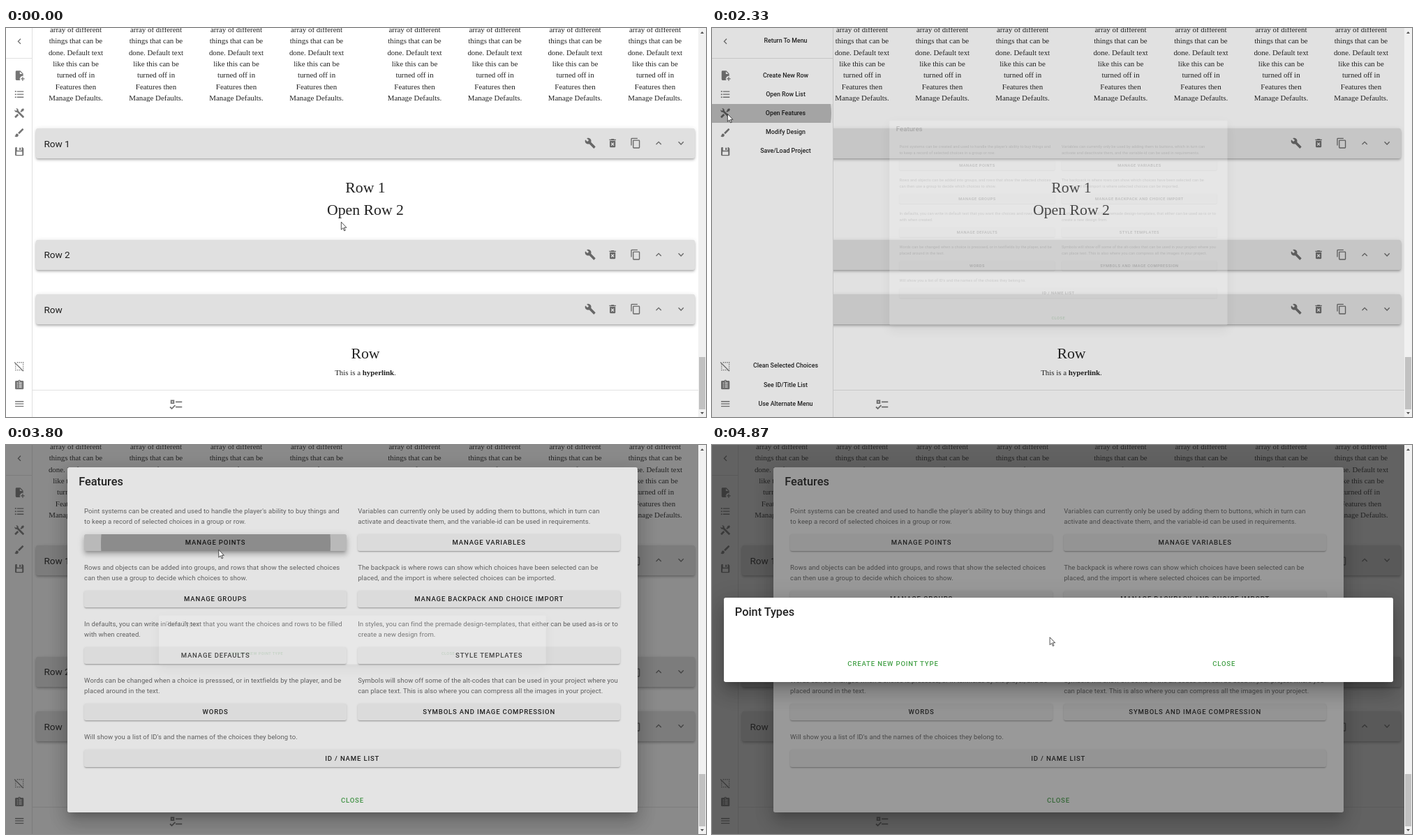
These frames come from a looping animation (1003 px wide and 558 px high, 5.99 s). An HTML page:

```html
<!DOCTYPE html>
<html lang="en">
<head>
<meta charset="utf-8">
<title>Row editor</title>
<style>
html, body { margin: 0; width: 100%; height: 100%; overflow: hidden; background: #fff; }
body { position: relative; font: 9.52px/20px Roboto, sans-serif; color: rgba(0,0,0,.87); }
div, svg { position: absolute; }
svg { fill: rgba(0,0,0,.54); fill-rule: evenodd; overflow: visible; }
.full { left: 0; top: 0; width: 992px; height: 558px; }
.mid { width: 400px; text-align: center; white-space: nowrap; }
.left { white-space: nowrap; }
.serif { font: 10.88px/16.32px "Liberation Serif", serif; }
.big { font-size: 21.76px; line-height: 20px; }
.bar { background: #e0e0e0; border-radius: 2.7px; box-shadow: 0 1.4px 2.7px -.7px rgba(0,0,0,.2), 0 2.7px 3.4px rgba(0,0,0,.14), 0 .7px 6.8px rgba(0,0,0,.12); }
.name { font-size: 13.6px; }
.drawer { left: 0; top: 0; height: 558px; background: #fff; overflow: hidden; box-sizing: border-box; border-right: 1px solid #e0e0e0; }
.item { left: 0; width: 100%; height: 27.2px; overflow: hidden; }
.item span { position: absolute; left: 38px; right: 0; font: 500 8.84px/27.2px Roboto, sans-serif; text-align: center; white-space: nowrap; overflow: hidden; }
.mini span { display: none; }
.scrim { background: #212121; }
.dialog { transform-origin: 496.25px 279.5px; }
.card { background: #fff; border-radius: 2.7px; box-shadow: 0 7.5px 10px -4.8px rgba(0,0,0,.2), 0 16px 26px 2px rgba(0,0,0,.14), 0 6px 31px 5.4px rgba(0,0,0,.12); }
.title { font-size: 16.32px; font-weight: 500; }
.note { color: rgba(0,0,0,.6); letter-spacing: .0071em; line-height: 14.96px; white-space: nowrap; }
.btn { background: #f5f5f5; border-radius: 2.7px; box-shadow: 0 2px .7px -1.4px rgba(0,0,0,.2), 0 1.4px 1.4px rgba(0,0,0,.14), 0 .7px 3.4px rgba(0,0,0,.12); }
.btn.pressed { box-shadow: 0 3.4px 3.4px -2px rgba(0,0,0,.2), 0 5.4px 6.8px .7px rgba(0,0,0,.14), 0 2px 9.5px 1.4px rgba(0,0,0,.12); }
.caps { font-weight: 500; letter-spacing: .0893em; }
.green { color: #43a047; }
.clip { left: 0; top: 0; width: 100%; height: 100%; overflow: hidden; border-radius: inherit; }
.ripple { border-radius: 50%; background: #000; }
.track { left: 992px; top: 0; width: 11px; height: 558px; background: #f1f1f1; }
.thumb { left: 1px; top: 472px; width: 9px; height: 75px; background: #c1c1c1; }
.pointer { left: 0; top: 0; fill: #fff; stroke: #000; stroke-width: 1; }
</style>
</head>
<body>
<script>
const icons = {
  back: 'M15.4 16.6 10.8 12l4.6-4.6L14 6l-6 6 6 6z',
  up: 'M7.4 15.4 12 10.8l4.6 4.6L18 14l-6-6-6 6z',
  down: 'M7.4 8.6 12 13.2l4.6-4.6L18 10l-6 6-6-6z',
  wrench: 'M22.7 19 13.6 9.9C14.5 7.6 14 4.9 12.1 3 10.1 1 7.1.6 4.7 1.7L9 6 6 9 1.6 4.7C.4 7.1.9 10.1 2.9 12.1 4.8 14 7.5 14.5 9.8 13.6l9.1 9.1c.4.4 1 .4 1.4 0l2.3-2.3c.5-.4.5-1.1.1-1.4z',
  trash: 'M6 19a2 2 0 0 0 2 2h8a2 2 0 0 0 2-2V7H6zM8.5 11.9l1.4-1.4 2.1 2.1 2.1-2.1 1.4 1.4-2.1 2.1 2.1 2.1-1.4 1.4-2.1-2.1-2.1 2.1-1.4-1.4 2.1-2.1zM15.5 4l-1-1h-5l-1 1H5v2h14V4z',
  copy: 'M19 21H8V7h11zM19 5H8a2 2 0 0 0-2 2v14a2 2 0 0 0 2 2h11a2 2 0 0 0 2-2V7a2 2 0 0 0-2-2zM16 1H4a2 2 0 0 0-2 2v14h2V3h12z',
  add: 'M14 2H6a2 2 0 0 0-2 2v16a2 2 0 0 0 2 2h7.8A6 6 0 0 1 20 13.1V8zM13 9V3.5L18.5 9zM23 20h-3v3h-2v-3h-3v-2h3v-3h2v3h3z',
  list: 'M7 5h14v2H7zM7 11h14v2H7zM7 17h14v2H7z' + [6, 12, 18].map(y => `M2.5 ${y}a1.5 1.5 0 0 1 3 0 1.5 1.5 0 0 1-3 0z`).join(''),
  tools: 'M21.7 20.3l-1.4 1.4a1 1 0 0 1-1.4 0L7 9.9A4 4 0 0 1 2.2 4.7l2.6 2.5 2.4-2.4-2.5-2.6A4 4 0 0 1 9.9 7l11.8 11.9a1 1 0 0 1 0 1.4zM2.3 18.9a1 1 0 0 0 0 1.4l1.4 1.4a1 1 0 0 0 1.4 0l5.5-5.4-2.8-2.9zM20 2l-4 2v2l-2.2 2.2 2 2L18 8h2l2-4z',
  brush: 'M20.7 4.6l-1.3-1.3a1 1 0 0 0-1.4 0l-9 9L11.8 15l8.9-9a1 1 0 0 0 0-1.4zM7 14a3 3 0 0 0-3 3c0 1.3-1.2 2-2 2 .9 1.2 2.5 2 4 2a4 4 0 0 0 4-4 3 3 0 0 0-3-3z',
  save: 'M5 3a2 2 0 0 0-2 2v14a2 2 0 0 0 2 2h14a2 2 0 0 0 2-2V5.5L18.5 3H17v6a1 1 0 0 1-1 1H8a1 1 0 0 1-1-1V3zM12 4v5h3V4zM7 12h10a1 1 0 0 1 1 1v6H6v-6a1 1 0 0 1 1-1z',
  clean: 'M1 4.3 2.3 3 21 21.7 19.7 23z' + [3, 7, 11, 15, 19].map(v => `M${v} 19h2v2h-2z` + (v > 3 ? `M${v} 3h2v2h-2z` : '') + (v > 3 && v < 19 ? `M3 ${v}h2v2h-2zM19 ${v}h2v2h-2z` : '')).join(''),
  clipboard: 'M19 3h-4.2a3 3 0 0 0-5.6 0H5a2 2 0 0 0-2 2v14a2 2 0 0 0 2 2h14a2 2 0 0 0 2-2V5a2 2 0 0 0-2-2zM12 3a1 1 0 0 1 0 2 1 1 0 0 1 0-2z' + [7, 11, 15].map(y => `M7 ${y}h2v2H7zM11 ${y}h6v2h-6z`).join(''),
  menu: 'M3 6h18v2H3zM3 11h18v2H3zM3 16h18v2H3z',
  checks: 'M3 5h6v6H3zM5 7v2h2V7zM11 7h10v2H11zM11 15h10v2H11zM5 20l-3.5-3.5 1.4-1.4L5 17.2l4.6-4.6L11 14z'
};

const add = (parent, cls, css = '', html = '') => {
  const node = document.createElement('div');
  node.className = cls;
  node.style.cssText = css;
  node.innerHTML = html;
  parent.append(node);
  return node;
};
const box = (parent, cls, x, y, w, h) => add(parent, cls, `left:${x}px;top:${y}px;width:${w}px;height:${h}px`);
const mid = (parent, x, y, str, cls) => add(parent, 'mid ' + cls, `left:${x - 200}px;top:${y - 10}px`, str);
const left = (parent, x, y, str, cls) => add(parent, 'left ' + cls, `left:${x}px;top:${y - 10}px`, str);
const icon = (parent, name, x, y, size = 16.32) => parent.insertAdjacentHTML('beforeend',
  `<svg viewBox="0 0 24 24" width="${size}" height="${size}" style="left:${x - size / 2}px;top:${y - size / 2}px"><path d="${icons[name]}"/></svg>`);

// Page
const page = add(document.body, 'full');
const filler = ['array of different', 'things that can be', 'done. Default text', 'like this can be', 'turned off in', 'Features then', 'Manage Defaults.'].join('<br>');
for (const x of [100, 215, 330, 445, 585.5, 700.5, 815.5, 930])
  add(page, 'mid serif', `left:${x - 200}px;top:-6px`, filler);
for (const [y, name] of [[165.5, 'Row 1'], [325.2, 'Row 2'], [403.6, 'Row']]) {
  box(page, 'bar', 43, y - 21.7, 944, 43.5);
  left(page, 54.4, y, name, 'name');
  ['wrench', 'trash', 'copy', 'up', 'down'].forEach((n, i) => icon(page, n, 837 + 32.64 * i, y));
}
mid(page, 515, 228.5, 'Row 1', 'serif big');
mid(page, 515, 261.2, 'Open Row 2', 'serif big');
mid(page, 515, 466.5, 'Row', 'serif big');
mid(page, 515, 496.4, 'This is a <b>hyperlink</b>.', 'serif');
add(page, '', 'left:38px;top:519px;width:954px;height:39px;background:#fff;border-top:1px solid #e2e2e2');
icon(page, 'checks', 244, 540, 22);

// Side menu
const drawer = add(document.body, 'drawer');
const items = [[18.7, 'back', 'Return To Menu'], [68.2, 'add', 'Create New Row'], [95.4, 'list', 'Open Row List'],
  [122.6, 'tools', 'Open Features'], [149.8, 'brush', 'Modify Design'], [177, 'save', 'Save/Load Project'],
  [485, 'clean', 'Clean Selected Choices'], [512.2, 'clipboard', 'See ID/Title List'], [539.4, 'menu', 'Use Alternate Menu']
].map(([y, name, str]) => {
  const item = add(drawer, 'item', `top:${y - 13.6}px`, `<span>${str}</span>`);
  icon(item, name, 19, 13.6);
  return item;
});
add(drawer, '', 'top:43px;width:100%;height:1px;background:#e0e0e0');
const featureItem = items[3];
const itemRipple = add(featureItem, 'ripple');

// Dialogs
const scrim1 = add(document.body, 'full scrim');
const features = add(document.body, 'full dialog');
box(features, 'card', 88, 31.7, 816.5, 495.4);
left(features, 104.2, 53.3, 'Features', 'title');

const button = (x, y, w, str) => {
  const btn = box(features, 'btn', x, y - 12.24, w, 24.48);
  const shade = add(btn, 'clip');
  mid(btn, w / 2, 12.24, str, 'caps');
  return { btn, shade };
};
const note = (x, y, str) => add(features, 'note', `left:${x}px;top:${y - 7.48}px`, str);
const entries = [
  ["Point systems can be created and used to handle the player's ability to buy things and<br>to keep a record of selected choices in a group or row.", 'MANAGE POINTS'],
  ['Variables can currently only be used by adding them to buttons, which in turn can<br>activate and deactivate them, and the variable-id can be used in requirements.', 'MANAGE VARIABLES'],
  ['Rows and objects can be added into groups, and rows that show the selected choices<br>can then use a group to decide which choices to show.', 'MANAGE GROUPS'],
  ['The backpack is where rows can show which choices have been selected can be<br>placed, and the import is where selected choices can be imported.', 'MANAGE BACKPACK AND CHOICE IMPORT'],
  ['In defaults, you can write in default text that you want the choices and rows to be filled<br>with when created.', 'MANAGE DEFAULTS'],
  ['In styles, you can find the premade design-templates, that either can be used as-is or to<br>create a new design from.', 'STYLE TEMPLATES'],
  ['Words can be changed when a choice is presssed, or in textfields by the player, and be<br>placed around in the text.', 'WORDS'],
  ['Symbols will show off some of the alt-codes that can be used in your project where you<br>can place text. This is also where you can compress all the images in your project.', 'SYMBOLS AND IMAGE COMPRESSION']
];
const buttons = entries.map(([str, name], i) => {
  const x = i % 2 ? 504.2 : 112.1, y = 80.95 * (i >> 1);
  note(x, 95.4 + y, str);
  return button(x, 140.1 + y, 376, name);
});
note(112.1, 419.4, "Will show you a list of ID's and the names of the choices they belong to.");
button(112.1, 449.6, 768.2, 'ID / NAME LIST');
mid(features, 496.4, 509.5, 'CLOSE', 'caps green');
const points = buttons[0];
const pointsRipple = add(points.shade, 'ripple');

const scrim2 = add(document.body, 'full scrim');
const types = add(document.body, 'full dialog');
box(types, 'card', 16.5, 218.9, 959.5, 121);
left(types, 32.8, 240.4, 'Point Types', 'title');
mid(types, 259.5, 314.2, 'CREATE NEW POINT TYPE', 'caps green');
mid(types, 733.7, 314.2, 'CLOSE', 'caps green');

// Scroll bar and pointer
add(document.body, 'track', '', '<div class="thumb"></div><svg width="11" height="558" style="fill:#505050"><path d="M3 8 5.5 5 8 8zM3 551 5.5 554 8 551z"/></svg>');
document.body.insertAdjacentHTML('beforeend', `<svg class="pointer" width="20" height="24">
<path id="arrow" transform="scale(.68)" d="M.5 .5V16.5L4.2 13 6.8 19 9.2 18 6.6 12.2H11.6Z"/>
<path id="hand" transform="translate(-4.4)scale(.68)" d="M5 13V2Q5 .5 6.5 .5T8 2V10 8Q8 6.5 9.5 6.5T11 8V10.5 8.5Q11 7 12.4 7T13.8 8.5V11 9.5Q13.8 8 15.2 8T16.5 9.5V15Q16.5 17 15 19V21.5H7V20L1 13.5Q0 11.5 1.5 11T4 12Z"/></svg>`);
const pointer = document.querySelector('.pointer');
const [arrow, hand] = pointer.children;

// Motion
const LOOP = 5990, STEP = 1000 / 15;
const clamp = u => Math.min(1, Math.max(0, u));
const ramp = (t, from, to) => clamp((t - from) / (to - from));
const sine = u => (1 - Math.cos(Math.PI * u)) / 2;
const bezier = (x1, y1, x2, y2) => u => {
  const at = (a, b, s) => 3 * (1 - s) ** 2 * s * a + 3 * (1 - s) * s * s * b + s ** 3;
  let lo = 0, hi = 1;
  for (let i = 0; i < 24; i++) {
    const s = (lo + hi) / 2;
    if (at(x1, x2, s) < u) lo = s; else hi = s;
  }
  return u <= 0 ? 0 : u >= 1 ? 1 : at(y1, y2, lo);
};
const standard = bezier(.4, 0, .2, 1), swift = bezier(.25, .8, .25, 1);

// time, x, y, eased until the next stop
const stops = [[0, 480, 278], [863, 480, 278, true], [1650, 22, 123], [2665, 22, 123], [2730, 48, 128], [3200, 241, 143],
  [3330, 303.5, 149.5], [3400, 304.5, 150], [4100, 304.5, 150, true], [4900, 484.5, 276], [LOOP, 484.5, 276]];

function movePointer(t) {
  const i = stops.findIndex(s => s[0] > t);
  const [t0, x0, y0, eased] = stops[i - 1], [t1, x1, y1] = stops[i];
  const u = (t - t0) / (t1 - t0), k = eased ? sine(u) : u;
  pointer.style.transform = `translate(${x0 + (x1 - x0) * k}px,${y0 + (y1 - y0) * k}px)`;
  const over = t > 1560 && t < 2190 || t > 2885 && t < 3660;
  hand.style.display = over ? '' : 'none';
  arrow.style.display = over ? 'none' : '';
}

function spread(node, t, start, x, y, w, h, fadeFrom, fadeTo) {
  const k = standard((t - start) / 250), r = Math.hypot(w, h) / 2 * (.2 + .8 * k);
  const cx = x + (w / 2 - x) * k, cy = y + (h / 2 - y) * k;
  Object.assign(node.style, { left: cx - r + 'px', top: cy - r + 'px', width: 2 * r + 'px', height: 2 * r + 'px' });
  node.style.opacity = t < start ? 0 : .25 * (1 - ramp(t, fadeFrom, fadeTo));
}

function open(dialog, scrim, t, start) {
  const k = swift((t - start) / 373);
  dialog.style.opacity = k;
  dialog.style.transform = k < 1 ? `scale(${.5 + .5 * k})` : 'none';
  scrim.style.opacity = .46 * swift((t - start + 12) / 373);
}

function draw(now) {
  const t = Math.floor((now % LOOP + 4) / STEP) * STEP % LOOP;
  movePointer(t);

  const wide = t > 1560 && t < 2345;
  drawer.style.width = 38 + 136 * (standard((t - 1560) / 270) - standard((t - 2345) / 225)) + 'px';
  drawer.classList.toggle('mini', !wide);
  featureItem.style.background = wide ? 'rgba(0,0,0,.04)' : '';
  spread(itemRipple, t, 2140, 22, 14, 174, 27.2, 2390, 2530);

  open(features, scrim1, t, 2312);
  open(types, scrim2, t, 3782);

  const shade = .08 * ramp(t, 2890, 3090) + .08 * ramp(t, 3660, 3760) - .16 * ramp(t, 3900, 4150);
  points.shade.style.background = `rgba(0,0,0,${Math.max(0, shade).toFixed(3)})`;
  points.btn.classList.toggle('pressed', t > 3660 && t < 3960);
  spread(pointsRipple, t, 3660, 192, 22, 376, 24.5, 3900, 4180);
}

const began = performance.now();
(function tick() {
  draw(performance.now() - began);
  requestAnimationFrame(tick);
})();
</script>
</body>
</html>
```
